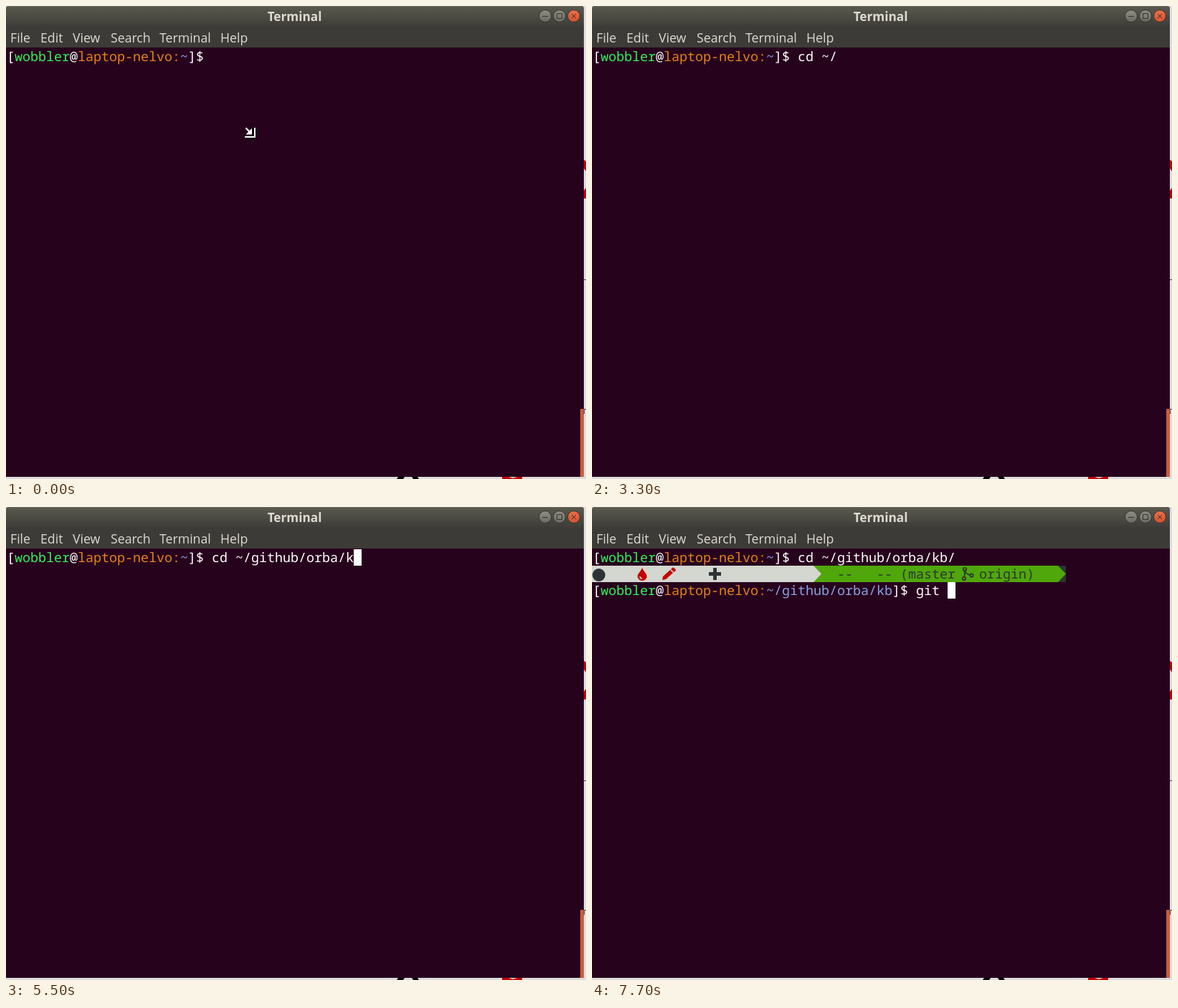
An HTML page for the animation above (8 s loop, 809 px wide and 661 px high).

```html
<!DOCTYPE html>
<html lang="en">
<head>
<meta charset="utf-8">
<title>Terminal</title>
<style>
  html, body { margin: 0; width: 100%; height: 100%; overflow: hidden; background: #27021d; }
  svg { display: block; width: 809px; height: 661px; }
  text { white-space: pre; }
  .ui { font: 17.7px "Open Sans", "Noto Sans", sans-serif; fill: #dfdbd2; }
  .title { font: bold 17.2px "Noto Sans", "Open Sans", sans-serif; text-anchor: middle; }
  .mono {
    font: 18.3333px "Noto Sans Mono", "DejaVu Sans Mono", monospace;
    fill: #fff; text-rendering: geometricPrecision;
  }
  .user { fill: #35f25c; }
  .host { fill: #e5841a; }
  .path { fill: #8ba3e4; }
  .dark { fill: #2e3436; }
  .red { fill: #c40000; }
  .line { fill: none; }
</style>
</head>
<body>
<svg viewBox="0 0 809 661">
  <defs>
    <linearGradient id="bar" x2="0" y2="1">
      <stop offset="0" stop-color="#5b5a50"/>
      <stop offset="1" stop-color="#3d3c37"/>
    </linearGradient>
    <linearGradient id="grey" x2="0" y2="1">
      <stop offset="0" stop-color="#8f8e84"/>
      <stop offset="1" stop-color="#6b6a62"/>
    </linearGradient>
    <linearGradient id="orange" x2="0" y2="1">
      <stop offset="0" stop-color="#ee6f4a"/>
      <stop offset="1" stop-color="#d5522e"/>
    </linearGradient>
    <g id="button">
      <circle r="8.500" stroke="#33322d"/>
    </g>
    <circle id="node" r="2.200"/>
    <path id="ibeam" d="M342.500 174q4 0 4.500 2.500q.5-2.500 4.500-2.500M347 176v14M342.500 192q4 0 4.500-2.500q.5 2.500 4.500 2.500"/>
  </defs>

  <!-- page behind the window -->
  <rect width="809" height="661" fill="#dedcdd"/>
  <path class="red" d="M806 215l3 2v14l-3-4zM806 258l3-4v15h-3zM692 661v-3h9l6 2 6-2h7v3z"/>
  <path class="line" d="M806 382.500h3M806 563.500h3M806.500 563v7" stroke="#444"/>
  <path d="M547 658h9l-2 3h-9zM566 658h8l2 3h-8z"/>

  <!-- window -->
  <path d="M0 58V4q0-4 4-4h798q4 0 4 4v54z" fill="#3c3b37"/>
  <path d="M0 29V4q0-4 4-4h798q4 0 4 4v25z" fill="url(#bar)"/>
  <path d="M4 .5h798" stroke="#6b6a60"/>
  <rect y="58" width="806" height="600" fill="#27021d"/>
  <rect x="801" y="563" width="5" height="95" fill="#c85d3c"/>
  <text class="ui title" x="402.500" y="21">Terminal</text>
  <text class="ui" y="51"><tspan x="6">File</tspan><tspan x="48">Edit</tspan><tspan x="93">View</tspan><tspan x="146">Search</tspan><tspan x="214">Terminal</tspan><tspan x="299">Help</tspan></text>
  <use href="#button" x="752" y="14" fill="url(#grey)"/>
  <use href="#button" x="772" y="14" fill="url(#grey)"/>
  <use href="#button" x="792" y="14" fill="url(#orange)"/>
  <path class="line" d="M748 14.500h8M768.500 10.500h7v7h-7zM789 11l6 6M795 11l-6 6" stroke="#33322d"/>

  <!-- shell -->
  <text class="mono" x="1" y="77">[<tspan class="user">wobbler</tspan>@<tspan class="host">laptop-nelvo:</tspan><tspan class="path">~</tspan>]$ <tspan id="cmd0"></tspan></text>
  <g id="reply">
    <rect class="dark" x="650" y="82" width="11" height="23"/>
    <path d="M309 82h341l11 11.500-11 11.500H309z" fill="#4fa70b"/>
    <path d="M0 82h309l11 11.500-11 11.500H0z" fill="#d3d7cf"/>
    <circle class="dark" cx="9.500" cy="95" r="9"/>
    <path class="red" d="M70 85c2 5 6.500 8 6.500 12a6.500 6 0 0 1-13 0c0-4 4.500-7 6.500-12z"/>
    <path class="line" d="M67 97q0 3 3 3" stroke="#d3d7cf" stroke-width="1.500"/>
    <path class="red" d="M98 102l1-5 10-9 4 4-10 9zM110 87l2-2q1-1 2 0l2.500 2q1 1 0 2l-2 2z"/>
    <path class="dark" d="M169 85h5v6h6v5h-6v6h-5v-6h-6v-5h6z"/>
    <g class="mono">
      <text class="dark" x="342" y="100">--   -- (master</text>
      <text class="dark" x="540" y="100">origin)</text>
    </g>
    <g class="line" stroke="#2e3436" stroke-width="1.800">
      <use href="#node" x="520" y="87"/>
      <use href="#node" x="519" y="100"/>
      <use href="#node" x="529.500" y="95.500"/>
      <path d="M520 89l-.5 9M520 89q2 5 7.500 6"/>
    </g>
    <text class="mono" x="1" y="123">[<tspan class="user">wobbler</tspan>@<tspan class="host">laptop-nelvo:</tspan><tspan class="path">~/github/orba/kb</tspan>]$ <tspan id="cmd1"></tspan></text>
  </g>
  <rect id="cursor" width="11" height="23" fill="#fff"/>

  <!-- mouse pointers -->
  <g id="corner" class="line">
    <path d="M347 169v15h-15" stroke="#000" stroke-width="4"/>
    <path d="M347 170v13h-14" stroke="#fff" stroke-width="2"/>
    <path d="M334.500 170.500l6 6" stroke="#fff" stroke-width="2.400"/>
    <path d="M343 171v8.500h-8.500z" fill="#fff"/>
  </g>
  <g id="beam" class="line">
    <use href="#ibeam" stroke="#000" stroke-width="3.500"/>
    <use href="#ibeam" stroke="#fff" stroke-width="1.500"/>
  </g>
</svg>
<script>
  const LOOP = 8000, CELL = 11, ROW = 23, KEY = 100, BLINK = 600;
  const POINTER = 500, ENTER = 6200;

  // Bursts of typing, one key (or completed word) every KEY ms.
  const bursts = {
    1000: ['c', 'd', ' '], 2700: ['~/'], 3500: ['g', 'i', 't'], 3900: ['hub/'],
    4400: ['or', 'ba/'], 5300: [''], 5500: ['k'], 6000: ['b', '/'],
    [ENTER]: [''], 7300: ['g', 'i'], 7600: ['t', ' ']
  };
  const keys = Object.entries(bursts).flatMap(([at, list]) =>
    list.map((text, i) => ({ at: +at + i * KEY, text })));

  const el = id => document.getElementById(id);
  const show = (id, on) => el(id).setAttribute('visibility', on ? 'visible' : 'hidden');
  const join = list => list.map(k => k.text).join('');

  function draw(t) {
    const pressed = keys.filter(k => k.at <= t);
    const last = pressed[pressed.length - 1];
    const cmd = [
      join(pressed.filter(k => k.at < ENTER)),
      join(pressed.filter(k => k.at > ENTER))
    ];
    cmd.forEach((text, i) => { el('cmd' + i).textContent = text; });

    // After Enter the cursor drops a line, then the reply pushes it one more.
    const row = Math.max(0, Math.min(2, Math.floor((t - ENTER) / KEY)));
    const column = [26 + cmd[0].length, 0, 41 + cmd[1].length][row];
    el('cursor').setAttribute('x', 1 + CELL * column);
    el('cursor').setAttribute('y', 59 + ROW * row);
    show('cursor', last && Math.floor((t - last.at) / BLINK) % 2 === 0);
    show('reply', row === 2);
    show('corner', t < POINTER);
    show('beam', t >= POINTER && !last);
  }

  const start = performance.now();
  function tick() {
    draw((performance.now() - start) % LOOP);
    requestAnimationFrame(tick);
  }
  tick();
</script>
</body>
</html>
```
